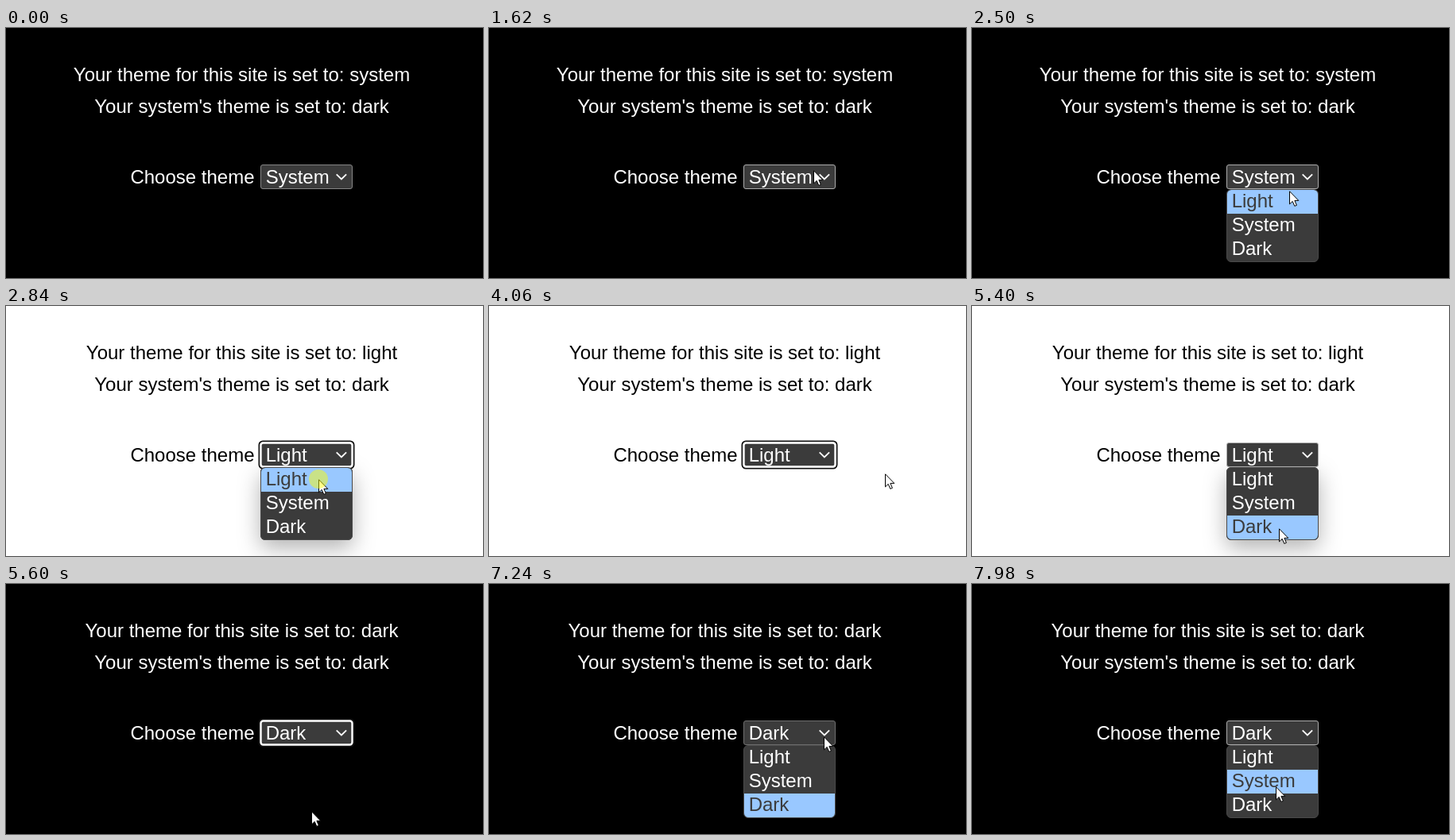
Recreate the animation shown at these times as an HTML page. Size 600x315 px, loop 8000 ms.

```html
<!DOCTYPE html>
<html lang="en">
<head>
<meta charset="utf-8">
<title>Theme chooser</title>
<style>
html, body { margin: 0; width: 100%; height: 100%; overflow: hidden; }
svg { display: block; width: 600px; height: 315px; }
text { font: 24px "Liberation Sans", Arial, sans-serif; }
.shade { filter: drop-shadow(0 10px 14px rgba(0, 0, 0, .3)); }
</style>
</head>
<body>
<svg viewBox="0 0 600 315">
  <rect id="page" width="600" height="315"/>
  <g id="copy">
    <text id="site" x="296.5" y="67" text-anchor="middle"></text>
    <text x="296.5" y="107" text-anchor="middle">Your system's theme is set to: dark</text>
    <text x="156.4" y="196">Choose theme</text>
  </g>
  <g id="popupShade" class="shade"><rect x="320" y="203" width="116" height="92" rx="6" fill="#3b3b3b"/></g>
  <rect id="box" x="320.5" y="172.5" width="115" height="30" rx="2.5" fill="#3b3b3b"/>
  <g id="ring" fill="none">
    <rect x="318.5" y="170.5" width="119" height="34" rx="4.5" stroke="#101010" stroke-width="2"/>
    <rect x="320.5" y="172.5" width="115" height="30" rx="3" stroke="#fff" stroke-width="2.4"/>
  </g>
  <text id="value" x="326.7" y="196" fill="#fff"></text>
  <path d="M415.7 184.4l6.2 6 6.2-6" fill="none" stroke="#fff" stroke-width="1.9"/>
  <g id="popup">
    <rect x="320.5" y="203.5" width="115" height="91" rx="5.5" fill="#3b3b3b" stroke="#4a4a4a"/>
    <path id="bar" fill="#99c8ff"/>
    <g id="rows"></g>
  </g>
  <path id="cursor" d="M.5 .8V16.9L4.2 13.4 6.8 19.4 9.4 18.3 6.9 12.4H11.8Z" fill="#fff" stroke="#000" stroke-width="1"/>
  <circle id="press" r="12" fill="#ff0" fill-opacity=".47"/>
</svg>
<script>
const LOOP = 8000;
const NAMES = ["Light", "System", "Dark"];
const BARS = [
  "M321 234V209.5a5.5 5.5 0 0 1 5.5-5.5h103a5.5 5.5 0 0 1 5.5 5.5V234z",
  "M321 234h114v30h-114z",
  "M321 264h114v24.5a5.5 5.5 0 0 1-5.5 5.5h-103a5.5 5.5 0 0 1-5.5-5.5z"
];
// start time, steps, target x, target y, step length
const MOVES = [
  [660, 4, 562, 187, 70],
  [1270, 6, 408, 179, 70],
  [1690, 3, 411, 182, 70],
  [2360, 5, 393, 218, 70],
  [3190, 3, 503, 212, 70],
  [4060, 7, 417, 186, 70],
  [5000, 7, 384, 286, 70],
  [6000, 3, 487, 262, 70],
  [6540, 9, 421, 192, 70],
  [7580, 7, 382, 255, 66]
];
const OPEN = [[1960, 2930], [4600, 5600], [7170, LOOP]];
const PRESS = [[1960, 2030], [2840, 2930], [4600, 4670], [5530, 5600], [7170, 7240]];
const ACTIVE = [[1960, 2030], [4600, 4670], [7170, 7310]];
const RING = [[2840, 4600], [5530, 7170]];

const $ = id => document.getElementById(id);
const within = (t, spans) => spans.some(([a, b]) => t >= a && t < b);
const show = (id, on) => $(id).setAttribute("display", on ? "inline" : "none");
const set = (id, name, value) => $(id).setAttribute(name, value);

const rows = NAMES.map((name, i) => {
  const row = document.createElementNS("http://www.w3.org/2000/svg", "text");
  row.setAttribute("x", 326.7);
  row.setAttribute("y", 226 + 30 * i);
  row.textContent = name;
  $("rows").append(row);
  return row;
});

function pointer(t) {
  let x = 571, y = 325;
  for (const [start, steps, tx, ty, len] of MOVES) {
    if (t < start) break;
    const p = Math.min(1, (Math.floor((t - start) / len) + 1) / steps);
    const e = p * p * (3 - 2 * p);
    x += (tx - x) * e;
    y += (ty - y) * e;
  }
  return [Math.round(x), Math.round(y)];
}

function render(t) {
  const [x, y] = pointer(t);
  const theme = t < 2840 ? 1 : t < 5530 ? 0 : 2;
  const light = theme === 0;
  const open = within(t, OPEN);
  const hover = open || (x >= 320 && x < 436 && y >= 172 && y < 203);

  set("page", "fill", light ? "#fff" : "#000");
  set("copy", "fill", light ? "#000" : "#fff");
  $("site").textContent = "Your theme for this site is set to: " + NAMES[theme].toLowerCase();
  $("value").textContent = NAMES[theme];
  set("box", "stroke", within(t, ACTIVE) ? "#6e6e6e" : hover ? "#acacac" : "#858585");
  show("ring", within(t, RING));

  show("popup", open);
  show("popupShade", open && light);
  const pick = y < 204 ? theme : Math.min(2, Math.floor((y - 204) / 30));
  set("bar", "d", BARS[pick]);
  rows.forEach((row, i) => row.setAttribute("fill", i === pick ? "#3b3b3b" : "#fff"));

  show("cursor", t >= 660);
  set("cursor", "transform", `translate(${x} ${y})`);
  show("press", within(t, PRESS));
  set("press", "cx", x);
  set("press", "cy", y);
}

const begin = performance.now();
function tick() {
  render((performance.now() - begin) % LOOP);
  requestAnimationFrame(tick);
}
render(0);
requestAnimationFrame(tick);
</script>
</body>
</html>
```
